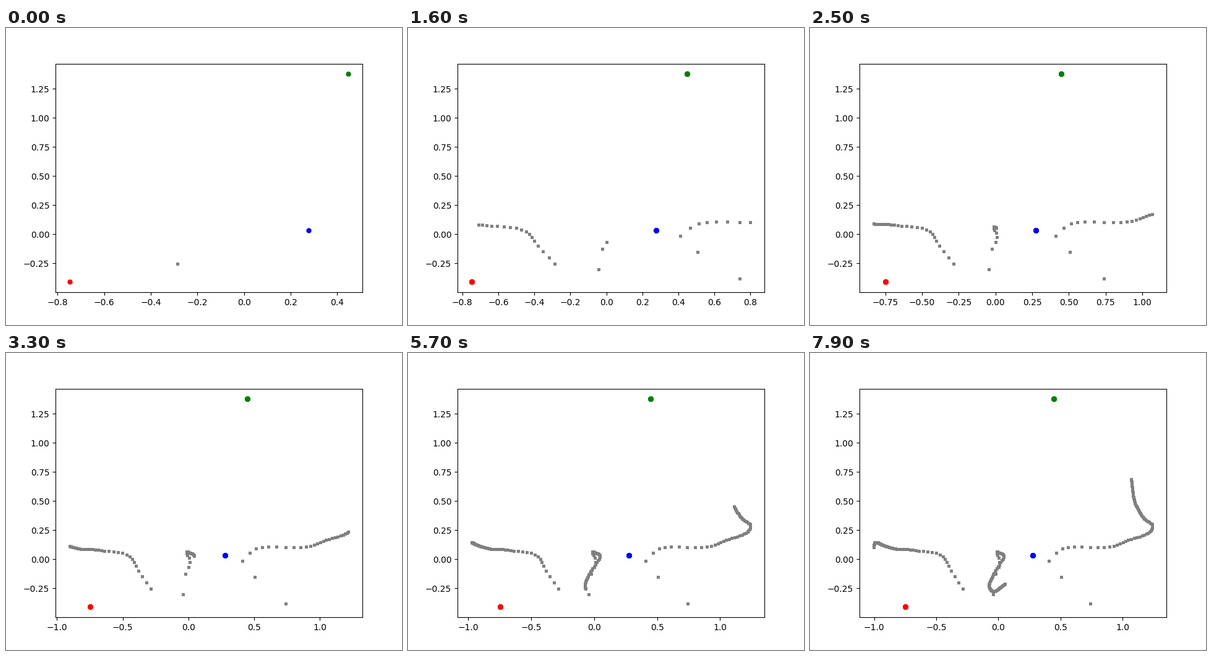
These frames come from a looping animation (640x480 px, 8 s). A matplotlib script:

```python
import numpy as np
import matplotlib.pyplot as plt
from matplotlib.animation import FuncAnimation

FRAMES = 80
STEP_MS = 100
START_GAP = 7  # steps between the starts of two trails

ANCHORS = [
    ("red", -0.749, -0.4103),
    ("green", 0.448, 1.378),
    ("blue", 0.277, 0.032),
]

# Key points of each trail: age in steps, x, y.
LEFT = [
    (0, -.286, -.252), (3, -.381, -.098), (7, -.446, .023),
    (14, -.665, .075), (25, -.830, .091), (33, -.905, .113),
    (57, -.975, .144), (70, -.996, .138), (79, -1.005, .103),
]
RIGHT = [
    (0, .740, -.379), (1, .505, -.153), (2, .409, -.015), (3, .465, .054),
    (6, .609, .106), (9, .800, .101), (18, 1.069, .173), (26, 1.217, .236),
    (32, 1.2385, .298), (37, 1.192, .332), (50, 1.112, .452),
    (72, 1.069, .686),
]
MIDDLE = [
    (0, -.043, -.301), (1, -.022, -.127), (2, .002, -.068),
    (6, -.013, .052), (11, .004, .055), (20, .043, .016),
    (27, -.021, -.093), (39, -.075, -.227), (49, -.041, -.276),
    (65, .053, -.212),
]


def hermite(t, v, s):
    """Smooth curve through the knots (t, v), sampled at s."""
    m = np.gradient(v, t)
    i = np.clip(np.searchsorted(t, s, side="right") - 1, 0, len(t) - 2)
    h = t[i + 1] - t[i]
    u = (s - t[i]) / h
    return ((1 + 2 * u) * (1 - u) ** 2 * v[i] + u * (1 - u) ** 2 * h * m[i]
            + u * u * (3 - 2 * u) * v[i + 1] + u * u * (u - 1) * h * m[i + 1])


def trail(keys, start):
    t, x, y = np.array(keys, float).T
    age = np.arange(FRAMES - start)
    return start, hermite(t, x, age), hermite(t, y, age)


trails = [trail(keys, i * START_GAP)
          for i, keys in enumerate((LEFT, RIGHT, MIDDLE))]

fig, ax = plt.subplots(figsize=(6.4, 4.8), dpi=100)
dots = [ax.plot([], [], "o", color=c, ms=5)[0] for c, _, _ in ANCHORS]
marks = [ax.plot([], [], "s", color="gray", ms=3, mew=0.72)[0]
         for _ in trails]


def update(k):
    # Anchors are painted again at every step, which hardens their edges.
    for dot, (_, x, y) in zip(dots, ANCHORS):
        dot.set_data(np.full(k + 1, x), np.full(k + 1, y))
    for mark, (start, x, y) in zip(marks, trails):
        n = max(0, k + 1 - start)
        mark.set_data(x[:n], y[:n])
    ax.relim()
    ax.autoscale_view()
    return dots + marks


anim = FuncAnimation(fig, update, frames=FRAMES, interval=STEP_MS,
                     init_func=lambda: update(0), repeat=True,
                     repeat_delay=0, blit=False)
plt.show()
```
